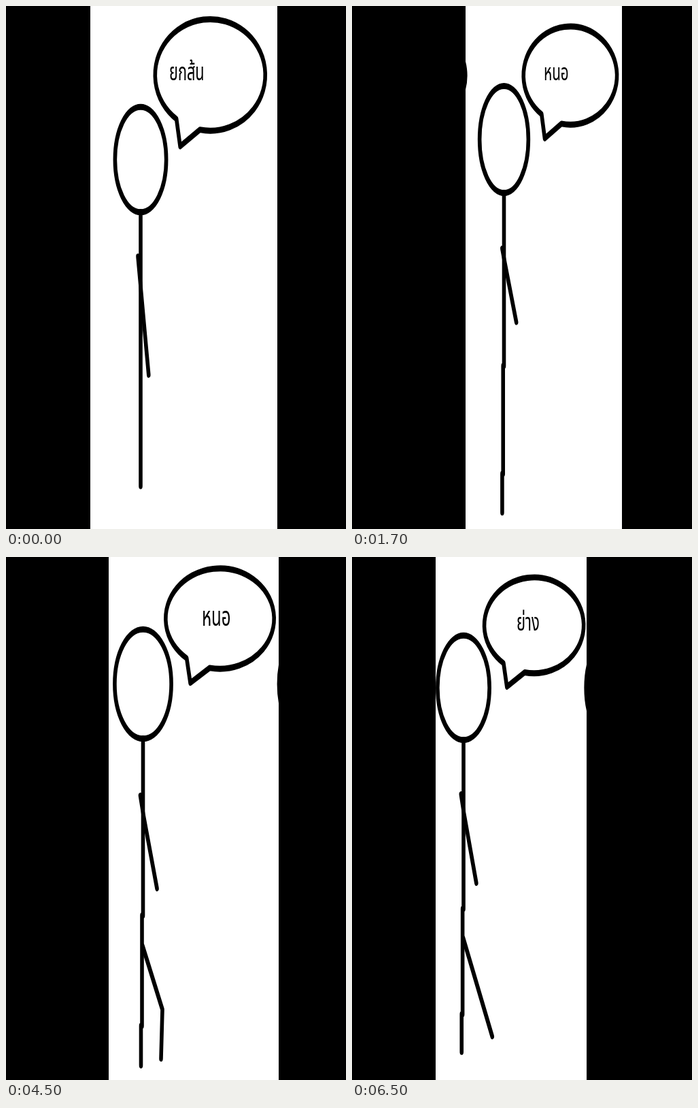
Animation of 500 by 768 pixels, one loop 8 s. Source, as an HTML page with a canvas:

```html
<!DOCTYPE html>
<html lang="th">
<meta charset="utf-8">
<style>
  html, body { margin: 0; height: 100%; overflow: hidden; background: #000; }
  canvas { display: block; }
</style>
<canvas id="stage" width="500" height="768"></canvas>
<script>
const ctx = document.getElementById('stage').getContext('2d');
const LOOP = 8000;
const TALL = 1.6; // pen and lettering are stretched upright

// One figure, measured from the middle of its head; poses change only parts of it.
const figure = {
  bubble: [113, -96, 79.7, 73.7],
  arm: [[-4, 164], [0.5, 192], [20.5, 300]],
  leg: [],
  spine: 560,
  lean: 1.5
};
const hip = [-0.5, 385], knee = [28.5, 478];

// at: head position, scale: figure size, next: distance to the neighbouring figure
const poses = [
  { start: 0, paper: [124, 399], at: [198, 225.5], scale: [0.905, 0.963],
    word: 'ยกส้น', wordAt: [240, 109], bubble: [113, -129, 89.5, 85],
    arm: [[-4.4, 148], [13, 328]], spine: 498, lean: 0 },
  { start: 500, paper: [167, 397], at: [223.5, 196], scale: [0.862, 0.978],
    word: 'หนอ', wordAt: [282, 109], next: -222.8,
    arm: [[-3, 164], [1, 183], [21, 274]] },
  { start: 2500, paper: [142, 402], at: [193.5, 185.5], scale: [1.036, 1],
    word: 'ยก', wordAt: [282, 101], next: 253.5, leg: [hip, knee, [20, 534]] },
  { start: 4500, paper: [151, 401], at: [201.5, 186.5], scale: [1, 1],
    word: 'หนอ', wordAt: [288, 101], next: 241.5, leg: [hip, knee, [26.5, 550]] },
  { start: 6500, paper: [123, 345], at: [164, 192], scale: [0.917, 0.955],
    word: 'ย่าง', wordAt: [242, 108], next: 218.3, leg: [hip, [46, 536]] }
].map(pose => ({ ...figure, ...pose }));

// Shapes are traced at the figure's scale, but the pen keeps its own.
function ink({ at, scale }, shift, trace) {
  ctx.save();
  ctx.translate(at[0] + shift, at[1]);
  ctx.scale(...scale);
  ctx.beginPath();
  trace();
  ctx.restore();
  ctx.save();
  ctx.scale(1, TALL);
  ctx.stroke();
  ctx.restore();
}

function speech([x, y, rx, ry]) {
  ctx.ellipse(x, y, rx, ry, 0, 2.23, 1.76 + 2 * Math.PI);
  ctx.lineTo(x - 0.545 * rx, y + 1.28 * ry);
  ctx.closePath();
}

const limb = points => points.forEach(point => ctx.lineTo(...point));

// The spine steps sideways twice on its way down.
const spine = ({ spine, lean }) => [
  [0, 80], [0, 340], [-lean, 340], [-lean, 502], [-2 * lean, 502], [-2 * lean, spine]
].filter(([, y]) => lean || y === 80 || y === spine);

function drawFigure(pose, shift) {
  const stroke = trace => ink(pose, shift, trace);
  stroke(() => ctx.ellipse(0, 0, 41.6, 80.3, 0, 0, 2 * Math.PI));
  stroke(() => speech(pose.bubble));
  for (const points of [spine(pose), pose.arm, pose.leg]) stroke(() => limb(points));
}

function write({ word, wordAt, scale }) {
  ctx.translate(...wordAt);
  ctx.scale(1, TALL);
  ctx.font = `500 ${24 * scale[0]}px "Noto Sans Thai", "Noto Sans", sans-serif`;
  ctx.fillText(word, 0, 0);
}

function draw(pose) {
  const [left, right] = pose.paper;
  ctx.fillStyle = '#000';
  ctx.fillRect(0, 0, 500, 768);
  ctx.save();
  ctx.beginPath();
  ctx.rect(left, 0, right - left, 768);
  ctx.clip();
  ctx.fillStyle = '#fff';
  ctx.fillRect(left, 0, right - left, 768);
  ctx.fillStyle = ctx.strokeStyle = '#000';
  ctx.lineWidth = 5.6;
  ctx.lineCap = ctx.lineJoin = 'round';
  drawFigure(pose, 0);
  if (pose.next) drawFigure(pose, pose.next);
  write(pose);
  ctx.restore();
}

function tick(now) {
  const t = now % LOOP;
  draw(poses.findLast(pose => pose.start <= t));
  requestAnimationFrame(tick);
}
requestAnimationFrame(tick);
</script>
</html>
```
